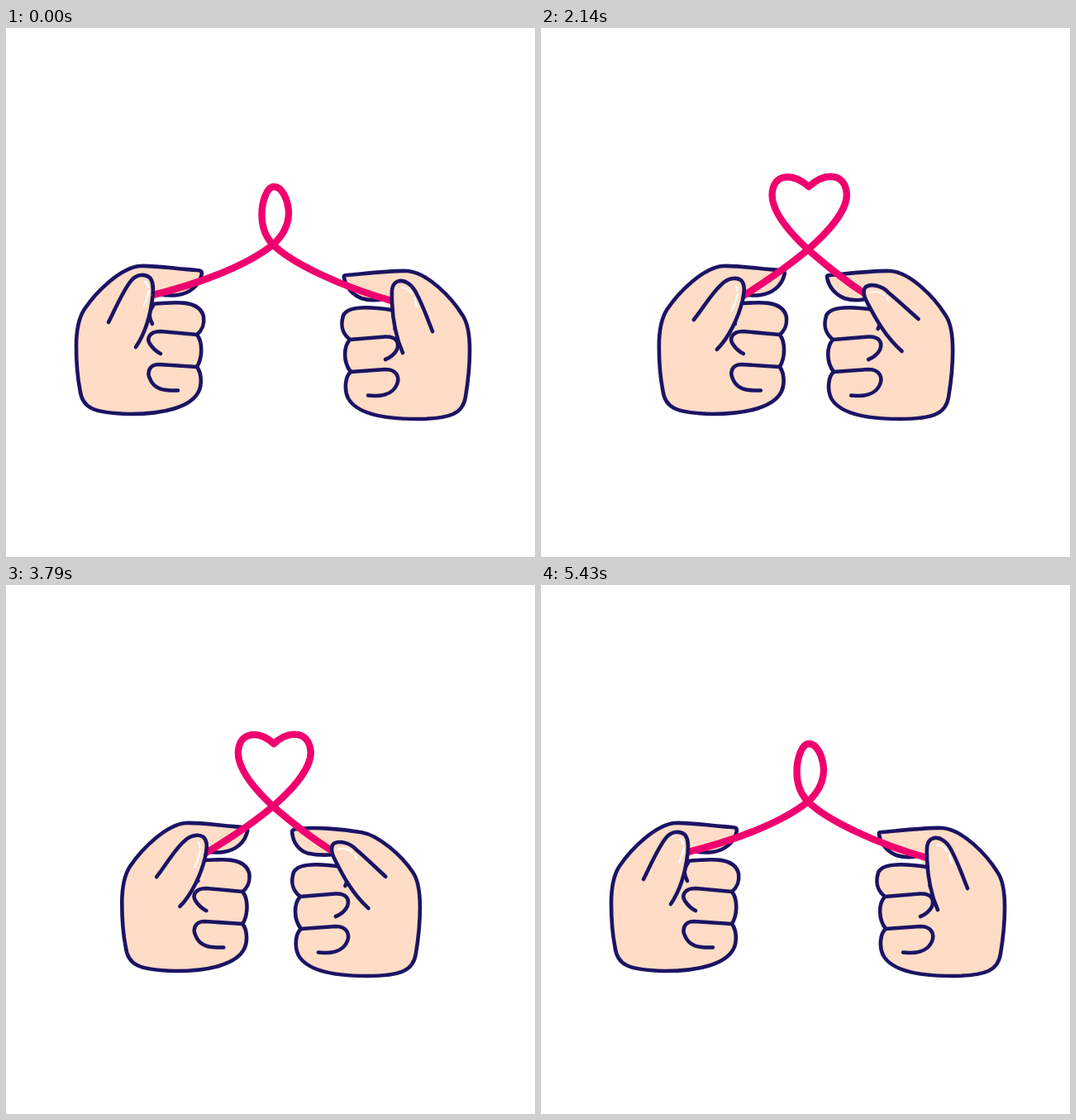
Animation of 640x640 px, one loop 5.64 s. Source, as an HTML page:

```html
<!DOCTYPE html>
<html lang="en">
<head>
<meta charset="utf-8">
<title>Heart string</title>
<style>
  html, body { margin: 0; width: 100%; height: 100%; overflow: hidden; background: #fff; }
  svg { display: block; width: 100vw; height: 100vh; }
  .line { stroke: #1b1464; stroke-width: 4.6; stroke-linecap: round; stroke-linejoin: round; fill: none; }
  .skin { fill: #ffdcc5; }
  .string { stroke: #f0006e; stroke-width: 8.4; stroke-linejoin: round; fill: none; }
  .shine { stroke: #fff; stroke-width: 2.2; stroke-linecap: round; fill: none; }
</style>
</head>
<body>
<svg viewBox="0 0 640 640">
  <g class="left">
    <path class="line skin" d="M176 334 C207 331 234 329 239 349 C240 357 239 364 231 371 C238 380 238 398 231 410 C237 418 237 432 233 440 C224 458 193 467 150 467 C104 466 92 459 89.500 438 C86 420 85 403 85 385 C85 372 87 352 95 340 C110 318 139 290 162 288 C180 287 210 292 231 293 Q237 293 237 297 C234 312 222 321 208 323 Q197 324.500 186 322"/>
    <path class="line" d="M178 336 C171 345 174 352 177 358 M231 371 L187 367 C173 367 170 376 174 382 Q179 390 187 394 M231 410 L185 407 C172 407 171 418 174 424 C179 437 190 439 208 438.500"/>
  </g>
  <g class="right">
    <path class="line skin" id="rightBody"/>
    <path class="line" d="M466 341 C475 348 474 357 470.500 364 M416 377 L459 373.500 C473 373 476 381 473 389 Q469 397 459 401 M417 416 L459 413 C474 413 476 424 473 431 C468 444 452 446 438 444.500"/>
  </g>
  <path class="string" id="string"/>
  <g class="left">
    <path class="line skin" id="leftThumb"/>
    <path class="shine" id="leftShine"/>
  </g>
  <g class="right">
    <path class="line skin" id="rightThumb"/>
    <path class="shine" id="rightShine"/>
  </g>
</svg>
<script>
const LOOP = 5640, STEP = 1000 / 14, START = 580, HALF = 1200;
const TRAVEL = { left: 74, right: -80.5 };

// Each part has an open pose and a pinched pose; paths match number for number.
const poses = {
  string: [
    'M174 324 C240 308 295 285 323 262 C340 247 342 233 342 223 C341 207 334 192 324 192 C316 192 309.5 209 309.5 226 C309.5 241 313 252 323 262 C345 284 405 313 470 331',
    'M242 326 C270 308 296 291 323 268 C352 243 370 219 370 202 C369 176 345 173 324 192 C304 174 280 176 279.5 202 C279.5 219 295 242 323 268 C345 287 366 305 394 323'],
  leftThumb: [
    'M124 356 C134 336 143 315 152 305 C158 298 168 297 174 302 C179 308 178 317 177.5 324 C175 346 168 370 157 386',
    'M127 353 C139 338 150 319 161 310 C168 303 178 301 184 305 C190 311 188 320 186 330 C181 350 170 374 155 389'],
  rightThumb: [
    'M516 367 C510 352 504 335 497 322 C492 311 482 303 473 307 C465 311 467 322 467 332 C468 355 472 375 480 393',
    'M519.5 352 C507 341 494 329 483 320 C476 312 463 309 456 313 C451 318 454 326 458 333 C467 350 479 373 499.5 391'],
  leftShine: [
    'M168 307 Q171 309 172 314 M173 318 Q171 327 167 336',
    'M178 312 Q180 314 179.500 318 M180 322 Q178 332 173 342'],
  rightShine: [
    'M479 314 Q486 314 491 322 M494 327 L497 337',
    'M461 320 Q470 317 478 323 M481 326 L484 331']
};
// The right index finger tilts while the hands close.
const rightBody = [
  'M466 341 C440 337 413 336 408 348 C405 358 405 368 416 377 C408 386 408 404 417 416 C410 422 409 438 414 448 C424 466 455 473 497 473 C539 473 553 466 556 446 C559 428 561 412 561 390 C561 378 560 358 552 347 C539 326 510 296 486 294 C468 293 435 297 412 299 Q408 299 409 302 C411 314 420 323 430 327 Q442 331 455 328',
  'M466 341 C440 337 413 336 408 348 C405 358 405 368 416 377 C408 386 408 404 417 416 C410 422 409 438 414 448 C424 466 455 473 497 473 C539 473 553 466 556 446 C559 428 561 412 561 390 C561 378 560 358 552 347 C539 328 512 304 491 300 C468 296 431 291 409 295 Q405 296 406 300 C407 312 414 321 424 324 Q438 327 455 326'];

const $ = id => document.getElementById(id);

function mix(a, b, k) {
  const target = b.match(/[\d.]+/g);
  let i = 0;
  return a.replace(/[\d.]+/g, n => (+n + (target[i++] - n) * k).toFixed(2));
}

function draw(ms) {
  const time = Math.floor((ms % LOOP + 5) / STEP) * STEP;
  const phase = Math.min(Math.max((time - START) / HALF, 0), 4);
  const cycle = phase % 2;
  const s = cycle < 1 ? cycle : 2 - cycle;
  const closed = s * s * (3 - 2 * s);
  const tilt = cycle < 1 ? Math.sin(Math.PI * cycle) : 0;

  for (const side in TRAVEL)
    for (const g of document.querySelectorAll('.' + side))
      g.setAttribute('transform', `translate(${TRAVEL[side] * closed} 0)`);
  for (const id in poses)
    $(id).setAttribute('d', mix(...poses[id], closed * 1.276));
  $('rightBody').setAttribute('d', mix(...rightBody, tilt));
}

const begin = performance.now();
function tick() {
  draw(performance.now() - begin);
  requestAnimationFrame(tick);
}
tick();
</script>
</body>
</html>
```
